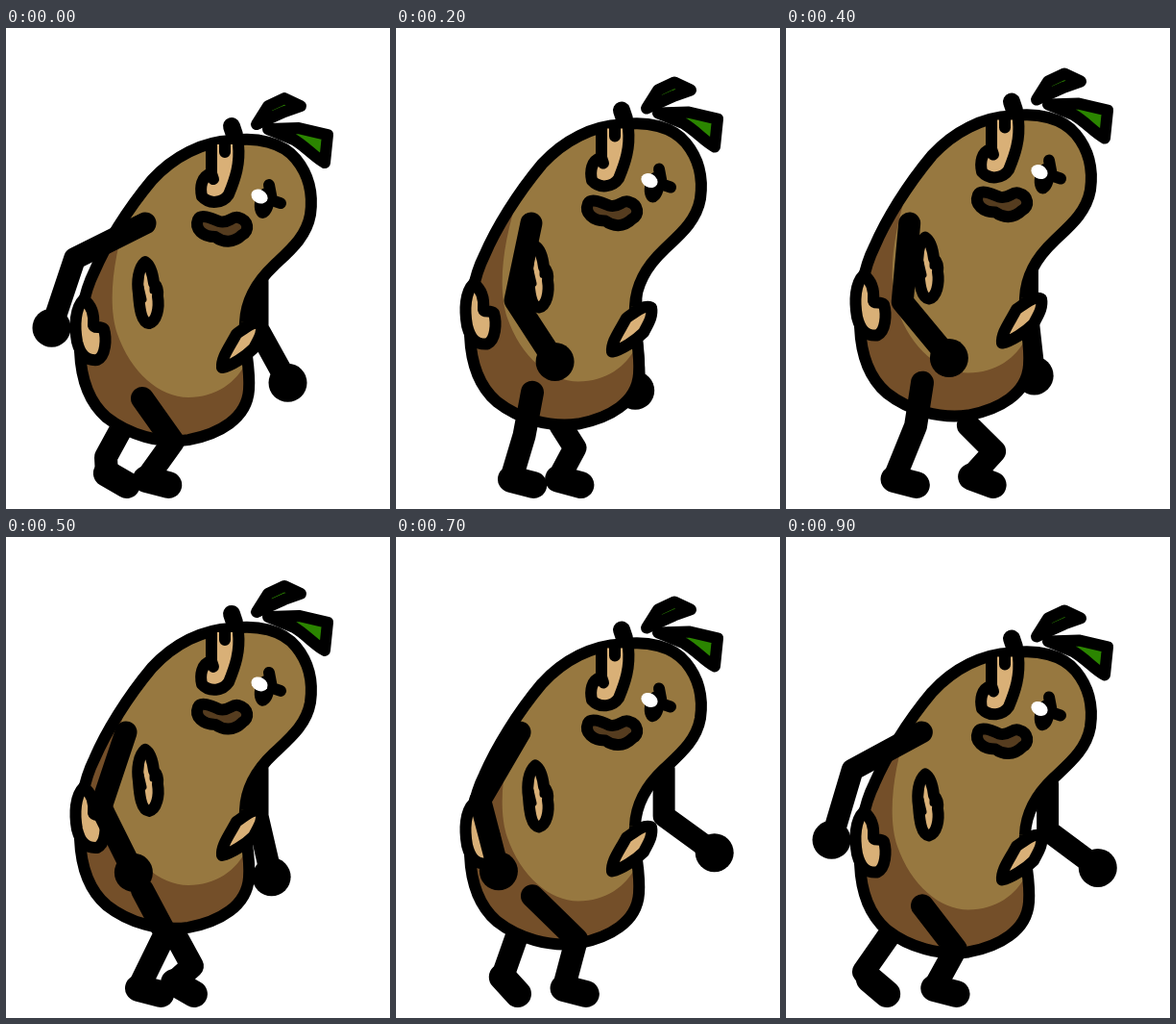
An HTML page that plays this animation: 400x500 px, repeating every 1 s.

```html
<!DOCTYPE html>
<html lang="en">
<head>
<meta charset="utf-8">
<title>Walking potato</title>
<style>
  html, body { margin: 0; width: 100%; height: 100%; overflow: hidden; background: #fff; }
  svg { display: block; width: 100%; height: 100%; }
  path, .outline { stroke: #000; stroke-width: 12; stroke-linecap: round; stroke-linejoin: round; fill: none; }
  .spot { fill: #d9b077; }
  .leaf { fill: #2b8500; }
  .mouth { fill: #553c1f; }
  .shade { fill: #744f29; stroke: none; }
  .notch { stroke-width: 7; }
  .stem { stroke-width: 18; }
  .arm { stroke-width: 23; }
  .leg { stroke-width: 24; }
  .foot { stroke-width: 28; }
  defs path { stroke: inherit; fill: inherit; }
</style>
</head>
<body>
<svg viewBox="0 0 400 500">
  <defs>
    <path id="shape" style="stroke:inherit;fill:inherit" d="M235 116 C262 112 288 118 302 135 C316 152 320 172 317 193 C313 216 296 230 279 246 C263 261 250 280 249 305 C247 330 255 350 253 375 C251 405 222 421 190 427 C160 431 128 422 105 404 C84 386 78 360 77 335 C76 305 80 276 92 252 C104 224 126 188 152 157 C175 132 205 117 235 116Z"/>
    <clipPath id="inside"><use href="#shape"/></clipPath>
  </defs>

  <path id="farArm" class="arm"/>
  <circle id="farHand" r="20"/>
  <path id="farLeg" class="leg"/>
  <path id="farFoot" class="foot"/>

  <g id="body">
    <use href="#shape" fill="#977840" stroke="none"/>
    <path class="shade" clip-path="url(#inside)" d="M128 188 C112 235 105 285 116 317 C130 357 160 383 190 383 C218 383 240 368 251 345 H280 V450 H50 V250Z"/>
    <use href="#shape" class="outline" style="fill:none"/>

    <path class="leaf" d="M261 99 L273 80 L290 72 L307 80 L290 86Z"/>
    <path class="leaf" d="M273 104 L305 103 L335 110 L332 139 C322 134 312 122 300 115Z"/>
    <path class="stem" d="M235 101 L238 110"/>

    <path class="spot" d="M214 120 V150 C203 153 202 165 204 174 C212 183 226 181 232 172 C239 155 244 140 242 120"/>
    <path d="M228 118 V128 M214 150 L216 156"/>

    <path class="spot" d="M145 242 C138 248 136 262 138 275 C139 290 141 305 149 306 C157 304 160 290 158 278 C159 270 157 267 154 264 C153 255 150 245 145 242Z"/>
    <path class="notch" d="M153 262 V272 M140 268 L143 281"/>
    <path class="spot" d="M81 281 C72 290 71 308 74 325 C77 337 82 345 95 344 C104 340 105 322 102 312 C98 308 92 312 91 308 C92 298 90 288 81 281Z"/>
    <path class="spot" d="M240 317 C250 310 258 303 266 306 C268 316 262 324 258 332 C250 340 235 350 225 352 C224 342 232 332 240 317Z"/>

    <ellipse cx="269" cy="181" rx="10" ry="16" transform="rotate(10 269 181)"/>
    <path d="M274 162 L277 178 L286 181"/>
    <ellipse cx="264" cy="174" rx="9" ry="7" fill="#fff" transform="rotate(28 264 174)"/>

    <path class="mouth" d="M200 198 C203 192 213 196 222 200 C232 203 235 194 242 196 C253 199 254 210 246 214 C237 223 226 222 218 216 C205 216 196 208 200 198Z"/>
  </g>

  <path id="nearLeg" class="leg"/>
  <path id="nearFoot" class="foot"/>
  <path id="nearArm" class="arm"/>
  <circle id="nearHand" r="20"/>
</svg>

<script>
const STEP = 100, COUNT = 10, GROUND = 475, FOOT = 24;
const set = (id, attrs) => {
  for (const name in attrs) document.getElementById(id).setAttribute(name, attrs[name]);
};
const line = (...points) => "M" + points.join(" L");

// Angles are in degrees from straight down, positive towards the front.
function reach([x, y], length, degrees) {
  const a = degrees * Math.PI / 180;
  return [x + length * Math.sin(a), y + length * Math.cos(a)];
}

function arm(side, shoulder, upper, upperAngle, fore, foreAngle) {
  const elbow = reach(shoulder, upper, upperAngle);
  const [cx, cy] = reach(elbow, fore, foreAngle);
  set(side + "Arm", { d: line(shoulder, elbow, [cx, cy]) });
  set(side + "Hand", { cx, cy });
}

// The toe stays on the ground, so a raised ankle tilts the foot.
function leg(side, hip, knee, ankle) {
  const drop = GROUND - ankle[1];
  const toe = [ankle[0] + Math.sqrt(FOOT * FOOT - drop * drop), GROUND];
  set(side + "Leg", { d: line(hip, knee, ankle) });
  set(side + "Foot", { d: line(ankle, toe) });
}

function pose(phase) {
  const a = phase * 2 * Math.PI;
  const c = Math.cos(a), s = Math.sin(a);
  const c2 = Math.cos(2 * a), s2 = Math.sin(2 * a);

  const rise = 14.5 * Math.cos(a + 0.7) - 10;
  set("body", { transform: `translate(0 ${rise})` });

  // The near arm swings with a fixed bend at the elbow.
  const swing = -22.5 * c + 17 * s - 11 * c2;
  arm("near", [135 + 10 * c + 3 * s, 203], 82, swing - 30, 76, swing + 15);

  const lift = 27 + 8 * c - 29 * s - 6 * c2 - 5 * s2;
  arm("far", [262 - 18 * s, 253 + 11 * c + 8 * s], 48, 0, 65, lift);

  const step = 4 * c - 30 * s + 9 * s2;
  leg("near", [142, 376 + 9 * c], [162 + step + 8 * c2, 421 + 9 * c], [142 + step, 469]);

  const stride = -45 * c + 54 * s;
  leg("far", [149 + 0.6 * stride, 413], [149 + stride, 446 - 10 * s], [140 + 0.78 * stride, 463 + 6 * s]);
}

let shown = -1;
function draw() {
  const now = Math.floor(performance.now() / STEP) % COUNT;
  if (now !== shown) pose((shown = now) / COUNT);
  requestAnimationFrame(draw);
}
draw();
</script>
</body>
</html>
```
